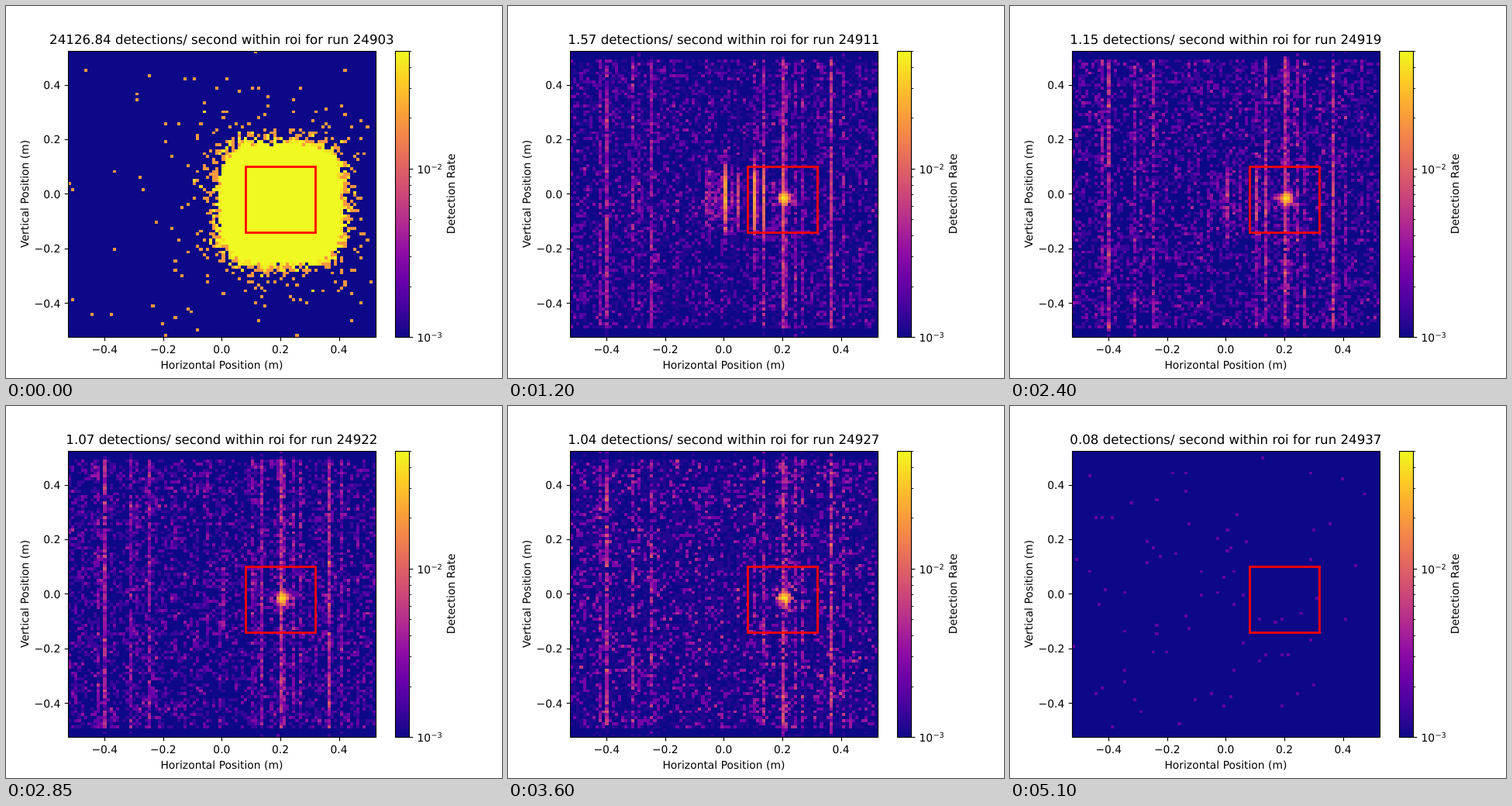
An HTML page with a canvas that plays this animation: 640x480 px, repeating every 5250 ms.

```html
<!DOCTYPE html>
<html lang="en">
<head>
<meta charset="utf-8">
<style>
html, body { margin: 0; width: 100%; height: 100%; overflow: hidden; background: #fff; }
canvas, svg { position: absolute; left: 0; top: 0; }
text { font-family: "DejaVu Sans", sans-serif; font-size: 13.89px; text-rendering: geometricPrecision; }
</style>
</head>
<body>
<canvas id="map" width="640" height="480"></canvas>
<svg id="plot" width="640" height="480" viewBox="0 0 640 480"></svg>
<script>
const FRAME_MS = 150, FRAMES = 35, FIRST_RUN = 24903, BINS = 96;
const AXES = { x: 80, y: 57.6, w: 396.8, h: 369.6 };
const LOW = 0.001, HIGH = 0.05;
const PLASMA = ['0d0887', '41049d', '6a00a8', '8f0da4', 'b12a90', 'cc4778',
  'e16462', 'f2844b', 'fca636', 'fcce25', 'f0f921']
  .map(hex => [0, 2, 4].map(i => parseInt(hex.slice(i, i + 2), 16)));

const ctx = document.getElementById('map').getContext('2d');
const svg = document.getElementById('plot');

const px = v => 278.4 + v * AXES.w / 1.05;
const py = v => 242.4 - v * AXES.h / 1.05;
const level = rate => Math.log(rate / LOW) / Math.log(HIGH / LOW);
const mix = (a, b, t) => a + (b - a) * t;
const snap = v => Math.round(v) + 0.5;

function plasma(t) {
  const s = Math.max(0, Math.min(1, t)) * 10, i = Math.min(9, Math.floor(s));
  return `rgb(${PLASMA[i].map((c, k) => Math.round(mix(c, PLASMA[i + 1][k], s - i)))})`;
}

function add(tag, attrs, content = '') {
  const el = document.createElementNS('http://www.w3.org/2000/svg', tag);
  for (const name in attrs) el.setAttribute(name, attrs[name]);
  el.textContent = content;
  svg.append(el);
  return el;
}

function label(content, x, y, anchor = 'middle', extra = {}) {
  return add('text', { x, y, 'text-anchor': anchor, ...extra }, content);
}

function tick(x, y, dx, dy, width = 1.11) {
  add('path', { d: `M${x} ${y}l${dx} ${dy}`, stroke: '#000', 'stroke-width': width });
}

// Outline between two corners, aligned to pixel centres.
function outline(left, top, right, bottom, stroke = '#000', weight = 1.11) {
  const x = snap(left), y = snap(top);
  add('rect', { x, y, width: snap(right) - x, height: snap(bottom) - y,
    fill: 'none', stroke, 'stroke-width': weight });
}

function buildAxes() {
  const right = AXES.x + AXES.w, bottom = AXES.y + AXES.h;
  outline(px(0.08), py(0.1), px(0.32), py(-0.14), '#f00', 2.78);
  outline(AXES.x, AXES.y, right, bottom);
  for (const v of [-0.4, -0.2, 0, 0.2, 0.4]) {
    const name = v.toFixed(1).replace('-', '\u2212');
    tick(snap(px(v)), 427.5, 0, 4.86);
    label(name, px(v), 448);
    tick(80.5, snap(py(v)), -4.86, 0);
    label(name, 70.3, Math.round(py(v) + 5.3), 'end');
  }
  label('Horizontal Position (m)', 278.4, 468);
  label('Vertical Position (m)', 0, 0, 'middle', { transform: 'translate(29 242.4) rotate(-90)' });

  for (let y = 58; y < 428; y++) {
    ctx.fillStyle = plasma((bottom - y) / AXES.h);
    ctx.fillRect(502, y, 18, 1);
  }
  outline(501.6, AXES.y, 520.08, bottom);
  const barY = rate => snap(bottom - level(rate) * AXES.h);
  for (let n = 2; n < 10; n++) tick(520.5, barY(n * 0.001), 2.78, 0, 0.83);
  for (let n = 2; n <= 5; n++) tick(520.5, barY(n * 0.01), 2.78, 0, 0.83);
  for (const power of [2, 3]) {
    const y = barY(10 ** -power);
    tick(520.5, y, 4.86, 0);
    label('10', 530.5, y + 5.5, 'start');
    label('\u2212' + power, 548.4, y + 0.3, 'start', { style: 'font-size:9.72px' });
  }
  label('Detection Rate', 0, 0, 'middle', { transform: 'translate(579 242.4) rotate(-90)' });
}

function randomizer(seed) {
  return () => {
    seed = (seed + 0x6d2b79f5) | 0;
    let t = Math.imul(seed ^ (seed >>> 15), 1 | seed);
    t = (t + Math.imul(t ^ (t >>> 7), 61 | t)) ^ t;
    return ((t ^ (t >>> 14)) >>> 0) / 4294967296;
  };
}

function poisson(mean, random) {
  if (mean > 30) return Math.round(mean);
  const limit = Math.exp(-mean);
  let count = 0, product = random();
  while (product > limit) {
    product *= random();
    count++;
  }
  return count;
}

// Rates of the full-height stripes and of the fading glow, by column.
const STRIPES = { 9: 0.0012, 11: 0.0026, 19: 0.0016, 21: 0.0008, 25: 0.0018, 57: 0.0007, 60: 0.0021,
  66: 0.0038, 67: 0.0016, 70: 0.0014, 72: 0.0012, 81: 0.0034, 85: 0.0011, 90: 0.0007 };
const GLOW = { 48: 0.015, 50: 0.002, 52: 0.005, 57: 0.016, 58: 0.002, 60: 0.009, 63: 0.001, 66: 0.004 };
const columnRandom = randomizer(11);
const COLUMN_GAIN = Array.from({ length: BINS }, () => 0.7 + 0.6 * columnRandom());

function stripedRate(col, row, glow) {
  const inside = row >= 3 && row <= 92;
  const dy = row - 49;
  const middle = Math.exp(-((dy / 10.5) ** 4));
  const haze = col > 41 && col < 48 ? 0.0022 * Math.exp(-((dy / 8) ** 2)) : 0;
  const distance = (col - 66.4) ** 2 + dy ** 2;
  const spot = 0.034 * Math.exp(-distance / 2.2) + 0.0012 * Math.exp(-distance / 16);
  const base = (inside ? 0.00098 : 0.00005) * COLUMN_GAIN[col];
  const stripe = (STRIPES[col] || 0) * (inside ? 1 : 0.35);
  return base + stripe + spot + glow * (middle * (GLOW[col] || 0) + haze);
}

// Mean counts of the rounded-square open beam.
function beamCounts(col, row) {
  const dx = Math.abs(col - 65.9) / 19.6, dy = Math.abs(row - 50.8) / 21;
  const d = (dx ** 3.5 + dy ** 3.5) ** (1 / 3.5);
  if (d < 0.93) return 40;
  const edge = 5 * Math.exp(-(d - 0.93) / 0.06);
  return edge + 0.26 * Math.exp(-(d - 0.93) / 0.3) + 0.006;
}

// Step, rate in the box, rate of a single count, strength of the glow.
const KEYS = [[1, 3.42, 0.0006, 2.8], [8, 1.57, 0.0006, 1], [12, 1.25, 0.0007, 0.5],
  [19, 1.07, 0.0007, 0.08], [24, 1.04, 0.0012, 0.03], [29, 1.01, 0.0008, 0], [33, 1, 0.0008, 0]];
const BEAM = { 0: [24126.84, 0.0195], 7: [412.63, 0.0195], 21: [236.48, 0.0195] };

function scene(step) {
  if (BEAM[step]) {
    const [roi, unit] = BEAM[step];
    return { roi, unit, counts: beamCounts };
  }
  if (step === FRAMES - 1) return { roi: 0.08, unit: 0.002, counts: () => 0.008 };
  const i = KEYS.findIndex(key => key[0] >= step);
  const b = KEYS[i], a = KEYS[Math.max(0, i - 1)];
  const t = a === b ? 0 : (step - a[0]) / (b[0] - a[0]);
  const [, roi, unit, glow] = a.map((v, k) => mix(v, b[k], t));
  return { roi, unit, counts: (col, row) => stripedRate(col, row, glow) / unit };
}

buildAxes();
const title = label('', 278.4, 49, 'middle', { style: 'font-size:16.67px' });

function draw(step) {
  const { roi, unit, counts } = scene(step);
  const random = randomizer(step * 7919 + 5);
  const edgeX = i => Math.round(AXES.x + i * AXES.w / BINS);
  const edgeY = i => Math.round(AXES.y + i * AXES.h / BINS);
  ctx.fillStyle = plasma(0);
  ctx.fillRect(80, 58, 397, 369);
  for (let row = 0; row < BINS; row++) {
    for (let col = 0; col < BINS; col++) {
      const rate = poisson(counts(col, row), random) * unit;
      if (rate <= LOW) continue;
      const x = edgeX(col), y = edgeY(row);
      ctx.fillStyle = plasma(level(rate));
      ctx.fillRect(x, y, edgeX(col + 1) - x, edgeY(row + 1) - y);
    }
  }
  title.textContent = `${roi.toFixed(2)} detections/ second within roi for run ${FIRST_RUN + step}`;
}

let shown = -1;
const start = performance.now();

function update() {
  const step = Math.floor((performance.now() - start) / FRAME_MS) % FRAMES;
  if (step !== shown) draw(shown = step);
  requestAnimationFrame(update);
}
update();
</script>
</body>
</html>
```
